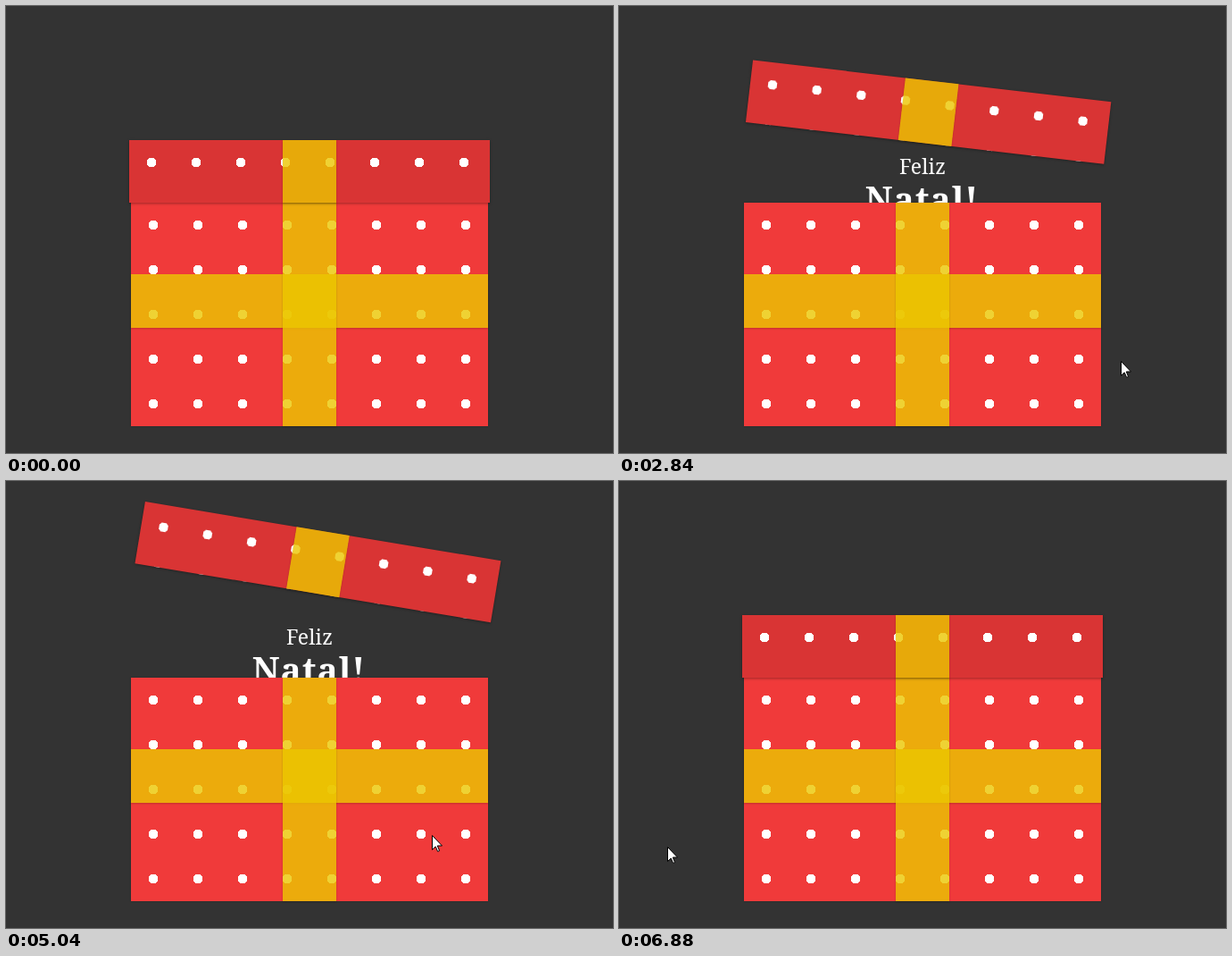
Recreate the animation shown at these times as an HTML page. Size 680 px wide and 500 px high, loop 9 s.

```html
<!DOCTYPE html>
<html lang="pt">
<head>
<meta charset="utf-8">
<title>Feliz Natal</title>
<style>
html, body { margin: 0; width: 100%; height: 100%; overflow: hidden; background: #333; }
#stage { position: relative; width: 680px; height: 500px; overflow: hidden; }
#stage > * { position: absolute; }
svg { left: 0; top: 0; overflow: visible; }
text { fill: #fff; font-family: "Noto Serif", serif; text-anchor: middle; }
.paper {
  background-image: radial-gradient(circle, #fff 15%, transparent 15.5%);
  background-size: 50px 50px;
}
.paper i {
  position: absolute;
  background: rgba(235, 199, 0, .8);
  box-shadow: 0 1px 2px rgba(0, 0, 0, .2);
}
.down { left: 170px; top: 0; width: 60px; height: 100%; }
.across { left: 0; top: 80px; width: 100%; height: 60px; }
#box {
  left: 140px; top: 220px; width: 400px; height: 250px;
  background-color: #f03a3a;
  box-shadow: 0 0 2px rgba(0, 0, 0, .2);
}
#lid {
  left: 138px; top: 150px; width: 404px; height: 70px;
  background-color: #d93434;
  box-shadow: 0 1px 3px rgba(0, 0, 0, .35);
}
#lid .down { left: 172px; }
</style>
</head>
<body>
<div id="stage">
  <svg width="680" height="500">
    <g id="words">
      <text x="340" y="162" font-size="23" letter-spacing=".2">Feliz</text>
      <text x="339.5" y="205" font-size="39" font-weight="700" letter-spacing=".9">Natal!</text>
    </g>
  </svg>
  <div id="box" class="paper"><i class="across"></i><i class="down"></i></div>
  <div id="lid" class="paper"><i class="down"></i></div>
  <svg width="680" height="500">
    <path id="arrow" d="M.5 .5V16.5L4.2 12.9L6.6 18.4L8.6 17.6L6.3 12H11.5Z" fill="#fff" stroke="#000"/>
  </svg>
</div>
<script>
const LOOP = 9000, STEP = 80;
const REST = 30; // how far the words sink while hidden
const $ = id => document.getElementById(id);
const lid = $('lid'), words = $('words'), arrow = $('arrow');

// The pointer comes, goes right, comes back, then leaves to the left
const entry = { x: 606, y: 454 };
const glides = [
  { start: 360, end: 920, x: 467, y: 371 },
  { start: 2280, end: 3400, x: 658, y: 424 },
  { start: 4240, end: 5040, x: 477, y: 396 },
  { start: 5800, end: 6560, x: 95, y: 405 },
  { start: 6560, end: 6880, x: 54, y: 409 }
];

// Each visit opens the gift, then closes it
const visits = [{ open: 688, close: 2562 }, { open: 4758, close: 6216 }];

function bezier(x1, y1, x2, y2) {
  const at = (a, b, u) => 3 * a * u * (1 - u) ** 2 + 3 * b * u * u * (1 - u) + u ** 3;
  return x => {
    if (x <= 0) return 0;
    if (x >= 1) return 1;
    let lo = 0, hi = 1;
    for (let i = 0; i < 24; i++) {
      const mid = (lo + hi) / 2;
      if (at(x1, x2, mid) < x) lo = mid; else hi = mid;
    }
    return at(y1, y2, lo);
  };
}
const ease = bezier(.25, .1, .25, 1);
const easeInOut = bezier(.42, 0, .58, 1);

// The picture advances in even steps, counted from the latest glide
function stepped(t) {
  const start = glides.reduce((s, g) => g.start <= t ? g.start : s, 0);
  return start + Math.floor((t - start) / STEP) * STEP;
}

function pointer(t) {
  let { x, y } = entry;
  for (const g of glides) {
    const f = easeInOut((t - g.start) / (g.end - g.start));
    x += (g.x - x) * f;
    y += (g.y - y) * f;
  }
  return [x, y].map(Math.round);
}

function draw(time) {
  const t = stepped(time);
  let raised = 0, shown = 0;
  for (const { open, close } of visits) {
    raised += ease((t - open) / 400) - easeInOut((t - close) / 690);
    shown += ease((t - open - 200) / 400) - ease((t - close - 20) / 450);
  }
  if (raised < .01) raised = 0;
  lid.style.transform =
    `translate(${10 * raised}px, ${-100 * raised}px) rotate(${10 * raised}deg)`;
  words.setAttribute('transform', `translate(0 ${REST * (1 - shown)})`);
  arrow.style.display = t < glides[0].start ? 'none' : '';
  arrow.setAttribute('transform', `translate(${pointer(t).join(' ')})`);
}

const began = performance.now();
function tick() {
  draw((performance.now() - began) % LOOP);
  requestAnimationFrame(tick);
}
tick();
</script>
</body>
</html>
```
